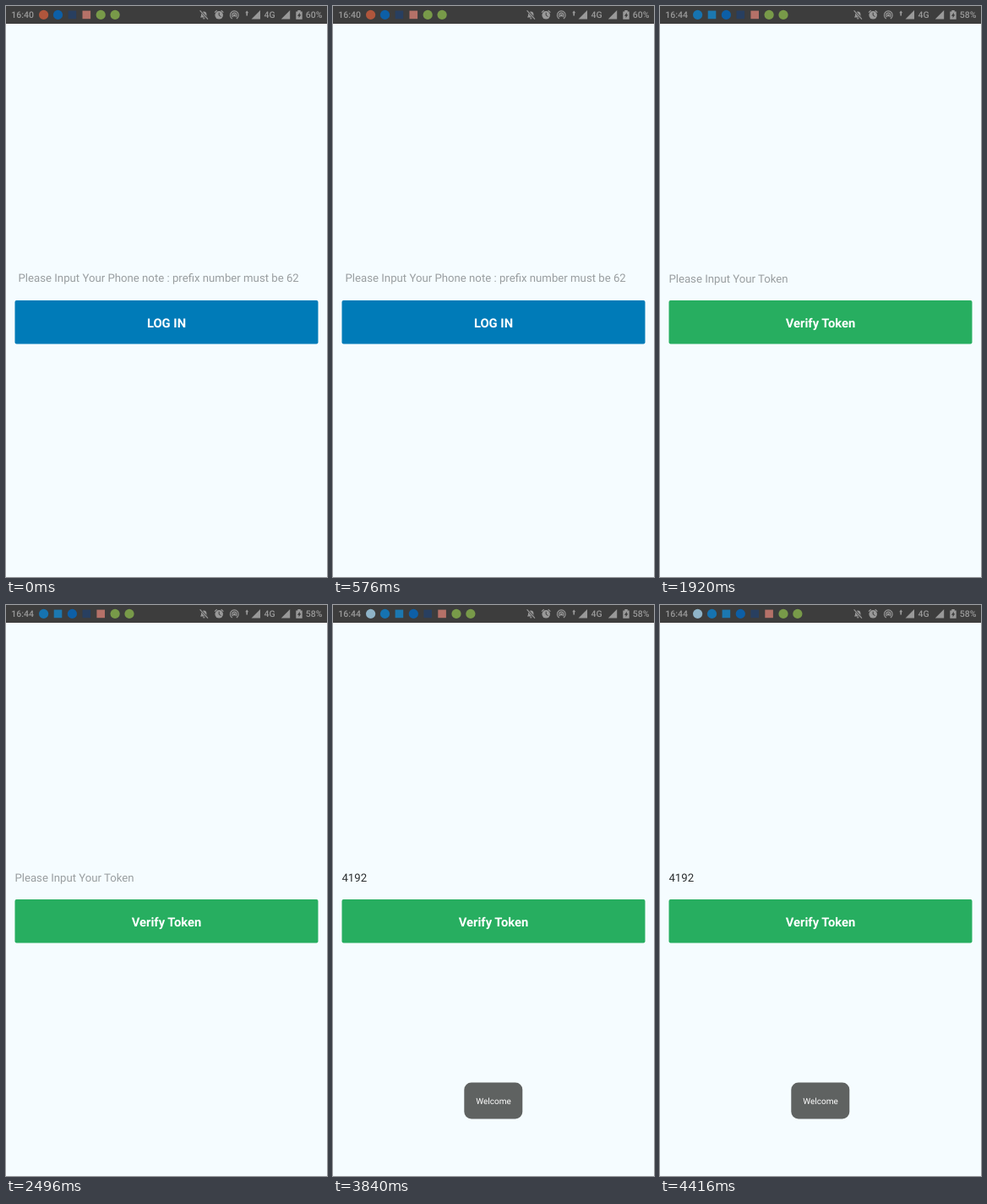
Recreate the animation shown at these times as an HTML page. Size 380 px wide and 675 px high, loop 4800 ms.

```html
<!DOCTYPE html>
<html lang="en">
<head>
<meta charset="utf-8">
<title>Phone login</title>
<style>
html, body { margin: 0; width: 100%; height: 100%; overflow: hidden; background: #f5fcff; }
svg { display: block; width: 380px; height: 675px; font-family: Roboto, sans-serif; text-rendering: geometricPrecision; }
#field { font-size: 13.2px; }
#label { font-size: 14.78px; font-weight: 700; fill: #fff; text-anchor: middle; }
#status text { font-size: 10.5px; font-weight: 500; fill: #999; }
#keys { font-size: 32px; fill: #0b1a20; text-anchor: middle; }
.line { fill: none; stroke: #999; stroke-width: 1.2; }
.key { fill: none; stroke: #56646b; stroke-width: 2; }
</style>
</head>
<body>
<svg viewBox="0 0 380 675">
  <rect width="380" height="675" fill="#f5fcff"/>

  <g id="status">
    <rect width="380" height="21" fill="#3d3d3d"/>
    <text id="clock" x="6.3" y="14.2"></text>
    <g id="icons"></g>
    <g fill="#999">
      <path d="M230 13.5 231 11.5V9a3.3 3.3 0 0 1 6.4 0V11.5L238.6 13.5ZM233 14.2h2.6a1.3 1.3 0 0 1-2.6 0Z"/>
      <path d="M229.8 5.3 239 15.6" stroke="#3d3d3d" stroke-width="2.6"/>
      <path d="M229.6 5.4 239 15.6" stroke="#999" stroke-width="1.2"/>
      <circle cx="252.2" cy="10.8" r="4.8"/>
      <path class="line" d="M247 7.6 249.7 5.2M257.4 7.6 254.7 5.2"/>
      <path d="M252.2 7.8V11L254.5 12.5" fill="none" stroke="#3d3d3d"/>
      <circle cx="270.3" cy="11" r="1.5"/>
      <path class="line" d="M267.7 14.9A4.9 4.9 0 1 1 272.9 14.9M268.7 13A2.7 2.7 0 1 1 271.9 13"/>
      <path d="M283.2 8.2 285.2 5.5 287.2 8.2H286V11.5H284.4V8.2Z"/>
      <path d="M290.5 15.5 301 5V15.5ZM325.7 15.5 336.2 5V15.5Z"/>
      <path d="M343.3 6.4H345.3V5H348.7V6.4H350.7V15.8H343.3Z"/>
      <path d="M347.8 7.7 344.9 11.7H346.6V14.3L349.3 10.3H347.8Z" fill="#3d3d3d"/>
    </g>
    <text x="305.6" y="14.2">4G</text>
    <text id="charge" x="354.8" y="14.2"></text>
  </g>

  <text id="field"></text>
  <g id="button">
    <rect x="10.5" y="348" width="359" height="51.5" rx="2"/>
    <text id="label" x="190" y="379.6"></text>
  </g>

  <g id="keyboard">
    <rect y="456.5" width="380" height="218.5" fill="#eceff1"/>
    <g id="keys"></g>
    <path d="M324.3 492.3H337" stroke="#0b1a20" stroke-width="2.4"/>
    <path class="key" d="M319.7 541.5V546.3H342.3V541.5"/>
    <path class="key" d="M324.2 588H343V606.5H324.2L318 597.2ZM327.6 593.2 335.8 601.4M335.8 593.2 327.6 601.4"/>
    <circle cx="330.5" cy="643.3" r="18.6" fill="#4db6ac"/>
    <path d="M322 643.6 327.7 649.2 339.5 637.4" fill="none" stroke="#fff" stroke-width="2.3"/>
  </g>

  <g id="toast">
    <rect x="155.3" y="564.5" width="69" height="43" rx="8.5" fill="#5f6261"/>
    <text x="190" y="590" font-size="10" fill="#fff" text-anchor="middle">Welcome</text>
  </g>
</svg>
<script>
const $ = id => document.getElementById(id);
const STEP = 960;

// Notification badges: colour and shape
const badge = {
  pale: ['#8fb4c8', 'circle'], sky: ['#1673b0', 'circle'], card: ['#1c78b0', 'square'],
  rust: ['#b0563c', 'circle'], blue: ['#0d5fa6', 'circle'], navy: ['#283f60', 'square'],
  coral: ['#b57168', 'square'], green: ['#789a49', 'circle']
};
const tail = ['blue', 'navy', 'coral', 'green', 'green'];

const login = { clock: '16:40', charge: '60%', x: 14.5, y: 326.3, label: 'LOG IN', color: '#007bb8' };
const verify = { clock: '16:44', charge: '58%', x: 10.4, y: 327.3, label: 'Verify Token', color: '#27ae60' };
const token = { ...verify, text: '4192', ink: '#2b2e2f', icons: ['pale', 'sky', 'card', ...tail] };

const scenes = [
  { ...login, text: 'Please Input Your Phone note : prefix number must be 62', icons: ['rust', ...tail] },
  { ...login, text: '620000000000', ink: '#16191a', shift: -108, keyboard: true, icons: ['card', 'rust', ...tail] },
  { ...verify, text: 'Please Input Your Token', icons: ['sky', 'card', ...tail] },
  token,
  { ...token, toast: true }
];

$('keys').innerHTML = [...'123456789,0.'].map((key, i) =>
  `<text x="${48.5 + i % 3 * 94}" y="${503.6 + Math.floor(i / 3) * 52.6}">${key}</text>`).join('');

function drawBadge(name, i) {
  const [color, shape] = badge[name], x = 44.6 + i * 16.9;
  return shape === 'circle'
    ? `<circle cx="${x}" cy="10.4" r="5.6" fill="${color}"/>`
    : `<rect x="${x - 4.8}" y="5.6" width="9.6" height="9.6" fill="${color}"/>`;
}

function show(scene) {
  const { x, y, ink = '#999ea0', shift = 0 } = scene;
  for (const id of ['clock', 'charge', 'label']) $(id).textContent = scene[id];
  $('icons').innerHTML = scene.icons.map(drawBadge).join('');
  const field = $('field');
  field.textContent = scene.text;
  field.setAttribute('x', x);
  field.setAttribute('y', y + shift);
  field.setAttribute('fill', ink);
  $('button').setAttribute('transform', `translate(0 ${shift})`);
  $('button').setAttribute('fill', scene.color);
  for (const id of ['keyboard', 'toast']) $(id).style.display = scene[id] ? '' : 'none';
}

let current = -1;
function tick() {
  const index = Math.floor(performance.now() / STEP) % scenes.length;
  if (index !== current) show(scenes[current = index]);
  requestAnimationFrame(tick);
}
tick();
</script>
</body>
</html>
```
